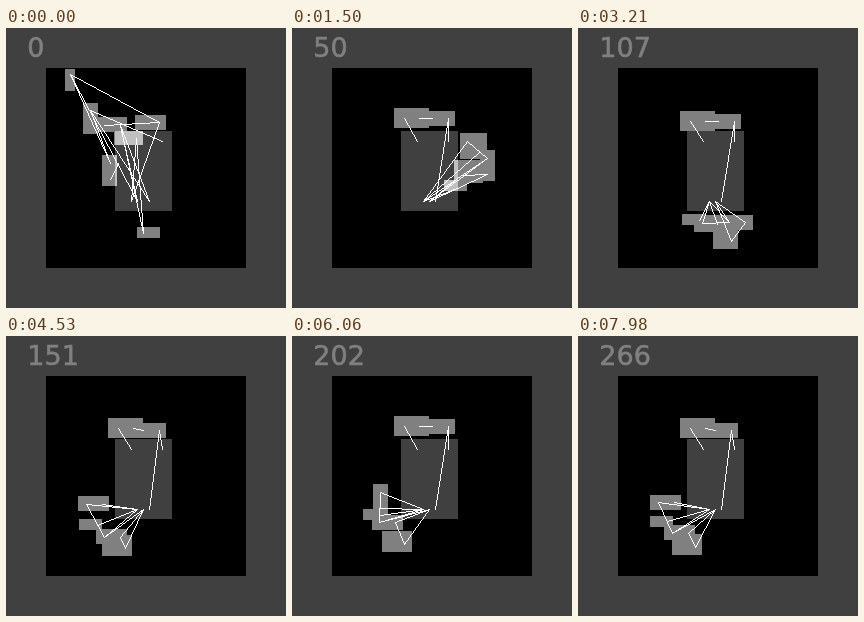
These frames come from a looping animation (280 by 280 pixels, 8 s). An HTML page with a canvas:

```html
<!DOCTYPE html>
<html>
<head>
<meta charset="utf-8">
<style>
html, body { margin: 0; width: 100%; height: 100%; overflow: hidden; background: #404040; }
canvas { display: block; }
</style>
</head>
<body>
<canvas id="stage" width="280" height="280"></canvas>
<script>
const ctx = document.getElementById('stage').getContext('2d');
const LOOP = 8000, STEP = 30, TAU = 2 * Math.PI;

const shoulderL = [125, 113], shoulderR = [156, 113];
const hips = [125, 131, 137, 143].map(x => [x, 173]);
const hub = [132, 172];
const crown = [64, 46];

// The limbs start tangled, are thrown up to the right, hang, then rest on the left.
const stages = [0, 1500, 3210, 4530];
// Each limb turns about the hub; keys hold its angle, reach and tilt (degrees) per stage.
const limbs = {
  thigh: { half: 8, pad: 7.5, bob: 3, roll: 120,
           keys: [[240, 94, 90], [313, 73, 43], [450, 24, 7], [545, 44, 0]] },
  shin:  { half: 8, pad: 7.5, bob: 16, roll: 0,
           keys: [[251, 79, 0], [332, 72, 90], [399, 36, 0], [491, 39, 0]] },
  lower: { half: 8, pad: 7.5, bob: 6, roll: 0,
           keys: [[226, 40, 90], [328, 53, 151], [426, 39, 48], [478, 43, 22]] },
  foot:  { half: 6, pad: 5.5, bob: 7, roll: 0,
           keys: [[71, 35, 180], [-23, 35, 0], [129, 26, 0], [160, 50, 0]] }
};

const mix = (a, b, k) => a + (b - a) * k;
const polar = ([x, y], degrees, r) =>
  [x + r * Math.cos(degrees * TAU / 360), y + r * Math.sin(degrees * TAU / 360)];
const ends = (centre, tilt, half) => [polar(centre, tilt, -half), polar(centre, tilt, half)];

function limbAt({ half, bob, roll, keys }, t) {
  const i = t < stages[1] ? 0 : t < stages[2] ? 1 : 2;
  const raw = Math.min(1, (t - stages[i]) / (stages[i + 1] - stages[i]));
  const k = i === 0 ? 1 - (1 - raw) ** 4 : raw * raw * (3 - 2 * raw);
  let [angle, reach, tilt] = keys[i].map((value, j) => mix(value, keys[i + 1][j], k));
  if (i === 2) reach += 15 * Math.sin(Math.PI * raw);
  const rest = Math.max(0, t - stages[3]);
  angle += bob * (1 - Math.cos(TAU * rest / 4200));
  tilt += roll * Math.sin(Math.PI * rest / 1150) ** 2;
  return ends(polar(hub, angle, reach), tilt, half);
}

function rect(x1, y1, x2, y2) {
  x1 = Math.floor(x1);
  y1 = Math.floor(y1);
  ctx.fillRect(x1, y1, Math.floor(x2) - x1, Math.floor(y2) - y1);
}

function bounds([a, b], pad) {
  rect(Math.min(a[0], b[0]) - pad, Math.min(a[1], b[1]) - pad,
       Math.max(a[0], b[0]) + pad, Math.max(a[1], b[1]) + pad);
}

// One-pixel lines without smoothing, from one point to several.
function fan(from, ...targets) {
  const [x, y] = from.map(Math.floor);
  for (const target of targets) {
    const dx = Math.floor(target[0]) - x, dy = Math.floor(target[1]) - y;
    const n = Math.max(1, Math.abs(dx), Math.abs(dy));
    for (let i = 0; i <= n; i++) {
      ctx.fillRect(Math.round(x + dx * i / n), Math.round(y + dy * i / n), 1, 1);
    }
  }
}

function draw(now) {
  const count = Math.floor(now % LOOP / STEP), t = count * STEP;
  const tangled = t < 120;

  const nod = TAU * (t - 6060) / 1140, c = Math.cos(nod), s = Math.sin(nod);
  const drop = 18 * Math.exp(-t / 60);
  const head = ends([119.5 + drop / 5, 91.7 - 1.7 * c + drop], 0, 7.5);
  const neck = ends([148 + 3 * s, 92 - 1.5 * c - 2.5 * s], 0, 8);
  const pose = {};
  for (const name in limbs) pose[name] = limbAt(limbs[name], t);
  const { thigh, shin, lower, foot } = pose;
  const ankle = foot[1];

  ctx.fillStyle = '#404040';
  ctx.fillRect(0, 0, 280, 280);
  ctx.fillStyle = '#000';
  ctx.fillRect(40, 40, 200, 200);

  ctx.fillStyle = '#808080';
  bounds(head, tangled ? 7 : 10);
  bounds(neck, 7.5);
  for (const name in limbs) bounds(pose[name], limbs[name].pad);
  if (tangled) rect(59, 41, 69, 63);

  // The torso brightens whatever lies over it.
  ctx.globalCompositeOperation = 'lighter';
  ctx.fillStyle = '#404040';
  ctx.fillRect(109, 103, 57, 80);
  ctx.globalCompositeOperation = 'source-over';

  ctx.fillStyle = '#fff';
  if (tangled) {
    fan(crown, neck[1], hips[1], lower[0]);
    fan(thigh[0], shoulderR, lower[0], hips[3]);
    fan(shin[1], ankle, hips[1], hips[3]);
    fan(neck[1], shin[0], hips[0]);
    fan(head[1], ankle, hips[0]);
    fan(lower[1], [112, 135]);
  } else {
    fan(head[0], shoulderL);
    fan(head[1], neck[0]);
    fan(neck[1], shoulderR, hips[3]);
    fan(hips[1], ...thigh, shin[0], ankle);
    fan(hips[2], ...shin, lower[1]);
    fan(thigh[0], shin[0]);
    fan(shin[1], lower[1]);
  }

  ctx.fillStyle = ctx.strokeStyle = '#808080';
  ctx.lineWidth = 0.6;
  ctx.font = '27px "DejaVu Sans", sans-serif';
  ctx.fillText(count, 21.3, 29.2);
  ctx.strokeText(count, 21.3, 29.2);
}

function tick() {
  draw(performance.now());
  requestAnimationFrame(tick);
}
tick();
</script>
</body>
</html>
```
